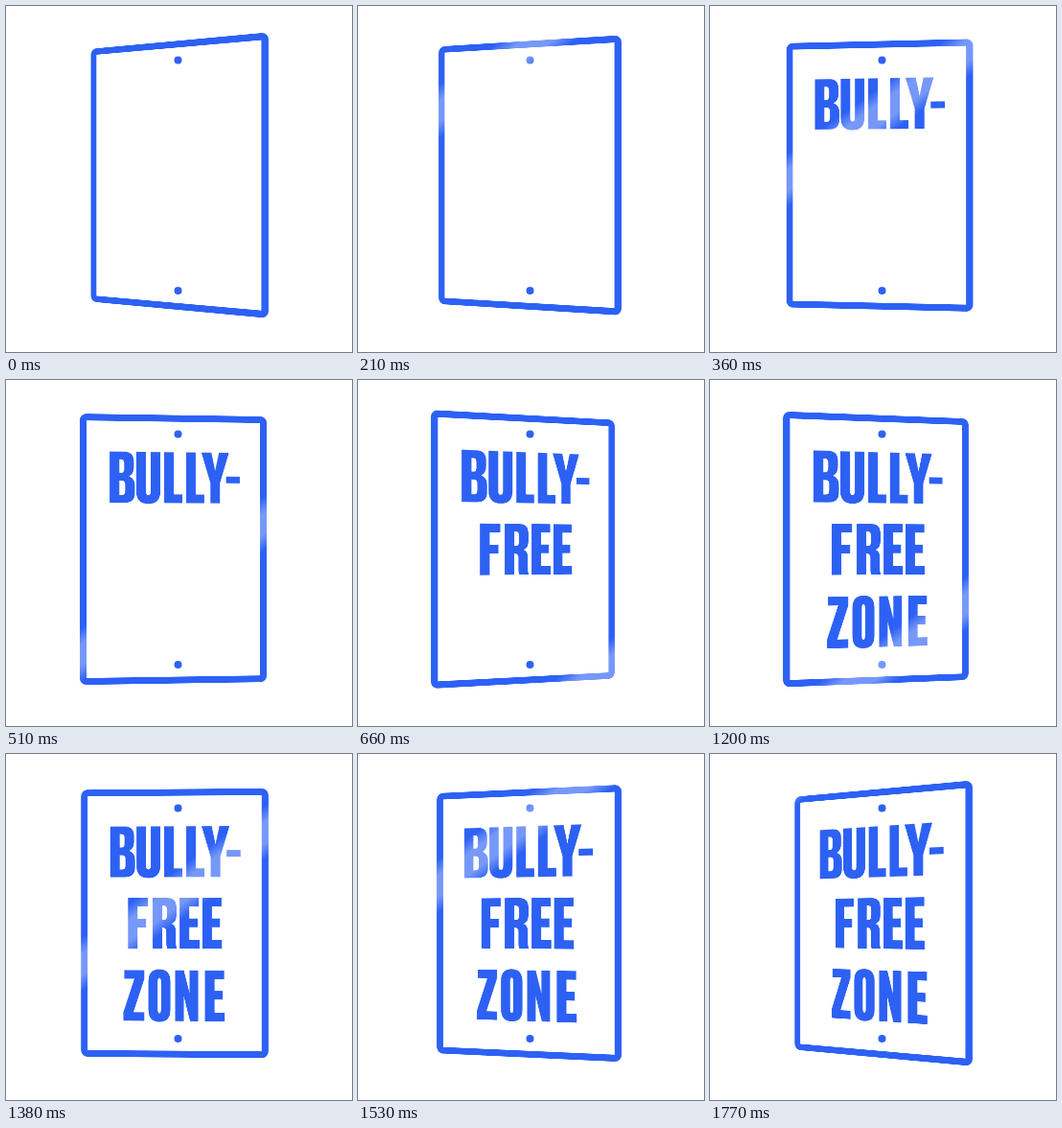
Write an HTML page with a canvas that moves like this. It is 361x361 px and loops after 1800 ms.

```html
<!DOCTYPE html>
<html lang="en">
<head>
<meta charset="utf-8">
<title>Bully-free zone</title>
<style>
html, body { margin: 0; width: 100%; height: 100%; overflow: hidden; background: #fff; }
canvas { display: block; }
</style>
</head>
<body>
<canvas id="stage" width="361" height="361" role="img" aria-label="Swinging sign: BULLY-FREE ZONE"></canvas>
<script>
const SIZE = 361, LOOP = 1800, STEP = 30;
const CX = 175.5, CY = 176.6, DEPTH = 520;
const HALF_W = 97.7, HALF_H = 140, BORDER = 7, PAD = 6, RES = 2;
const BLUE = '#2d61f4';

const stage = document.getElementById('stage').getContext('2d');
const flat = document.createElement('canvas');
flat.width = Math.ceil((HALF_W + PAD) * 2 * RES);
flat.height = Math.ceil((HALF_H + PAD) * 2 * RES);
const art = flat.getContext('2d');

// Condensed capitals, 53 units tall
const glyphs = {
  B: 'M0 0H15Q25 0 25 10V16Q25 23 20 25.5Q26 28 26 35V43Q26 53 15 53H0Z' +
     'M10 8V22H12Q15 22 15 18V12Q15 8 12 8ZM10 30V45H12.5Q16 45 16 41V34Q16 30 12.5 30Z',
  U: 'M0 0H10V41Q10 45 12.5 45T15 41V0H25V41Q25 54 12.5 54T0 41Z',
  L: 'M0 0H10V44H19V53H0Z',
  Y: 'M0 0H10.5L14.5 19L18.5 0H29L19.5 32V53H9.5V32Z',
  '-': 'M0 25H14.5V32H0Z',
  F: 'M0 0H21V9H10V22H19V31H10V53H0Z',
  R: 'M0 0H15Q25 0 25 10V18Q25 25 20 27Q24.5 29 24.5 35V47Q24.5 51 25.5 53H15.5' +
     'Q14.5 51 14.5 47V36Q14.5 31 11 31H10V53H0ZM10 8V23H12Q15 23 15 19V12Q15 8 12 8Z',
  E: 'M0 0H20V9H10V21.5H18.5V30.5H10V44H20.5V53H0Z',
  Z: 'M1 0H22V9L10.5 44H22V53H0V44L11.5 9H1Z',
  O: 'M11.5 -1Q23 -1 23 12V41Q23 54 11.5 54T0 41V12Q0 -1 11.5 -1Z' +
     'M11.5 8Q9.8 8 9.8 12V41Q9.8 45 11.5 45T13.2 41V12Q13.2 8 11.5 8Z',
  N: 'M0 0H9L15 24V0H24V53H15.5L9 27V53H0Z'
};
for (const key in glyphs) glyphs[key] = new Path2D(glyphs[key]);

const lines = [
  { text: 'BULLY-', from: 270, y: -101.3, x: [-67, -39.5, -10.5, 12.5, 28.5, 54.5] },
  { text: 'FREE', from: 540, y: -26.5, x: [-48.3, -22.7, 5.8, 29.2] },
  { text: 'ZONE', from: 810, y: 49, x: [-53.2, -27, 1, 32] }
];

function drawFlat(t) {
  art.setTransform(1, 0, 0, 1, 0, 0);
  art.clearRect(0, 0, flat.width, flat.height);
  art.setTransform(RES, 0, 0, RES, flat.width / 2, flat.height / 2);
  art.strokeStyle = art.fillStyle = BLUE;
  art.lineWidth = BORDER;
  const w = HALF_W - BORDER / 2, h = HALF_H - BORDER / 2;
  art.beginPath();
  art.roundRect(-w, -h, w * 2, h * 2, 3.5);
  art.stroke();
  for (const line of lines) {
    if (t < line.from) continue;
    line.x.forEach((x, i) => {
      art.save();
      art.translate(x, line.y);
      art.fill(glyphs[line.text[i]], 'evenodd');
      art.restore();
    });
  }
}

// Swing angle: a cosine slightly flattened towards a triangle wave
function swing(t) {
  const a = t / LOOP * Math.PI * 2;
  return -(18.2 * Math.cos(a) + 0.9 * Math.cos(3 * a)) * Math.PI / 180;
}

// Turn the flat art about its vertical axis, one column at a time
function project(angle) {
  const sin = Math.sin(angle), cos = Math.cos(angle);
  const toSign = d => d * DEPTH / (DEPTH * cos - d * sin);
  for (let x = 60; x < 290; x++) {
    const left = toSign(x - CX), right = toSign(x + 1 - CX);
    const sx = left * RES + flat.width / 2, sw = (right - left) * RES;
    if (sx < 0 || sx + sw > flat.width) continue;
    const scale = DEPTH / (DEPTH + (left + right) / 2 * sin);
    const h = flat.height / RES * scale;
    stage.drawImage(flat, sx, 0, sw, flat.height, x, CY - h / 2, 1, h);
  }
}

function bolt(y) {
  stage.beginPath();
  stage.arc(179.5, y, 4, 0, Math.PI * 2);
  stage.fill();
}

// Slanted sheen, crossing forwards and then back
function sheen(t) {
  const q = Math.min(t, LOOP - t) - 270;
  const mid = q < 0 ? 198 + 0.45 * q : 198 + 0.386 * q + 0.00092 * q * q;
  const slope = 0.72, norm = slope * slope + 1, half = 28;
  const a = (mid - half) / norm, b = (mid + half) / norm;
  const band = stage.createLinearGradient(a * slope, a, b * slope, b);
  band.addColorStop(0, 'rgba(255,255,255,0)');
  band.addColorStop(0.3, 'rgba(255,255,255,.35)');
  band.addColorStop(0.7, 'rgba(255,255,255,.35)');
  band.addColorStop(1, 'rgba(255,255,255,0)');
  stage.fillStyle = band;
  stage.fillRect(0, 0, SIZE, SIZE);
}

function draw(t) {
  stage.fillStyle = '#fff';
  stage.fillRect(0, 0, SIZE, SIZE);
  drawFlat(t);
  project(swing(t));
  stage.fillStyle = BLUE;
  bolt(56.5);
  bolt(297);
  sheen(t);
}

let start;
function tick(now) {
  if (start === undefined) start = now;
  const t = (now - start) % LOOP;
  draw(Math.floor(t / STEP) * STEP);
  requestAnimationFrame(tick);
}
draw(0);
requestAnimationFrame(tick);
</script>
</body>
</html>
```
